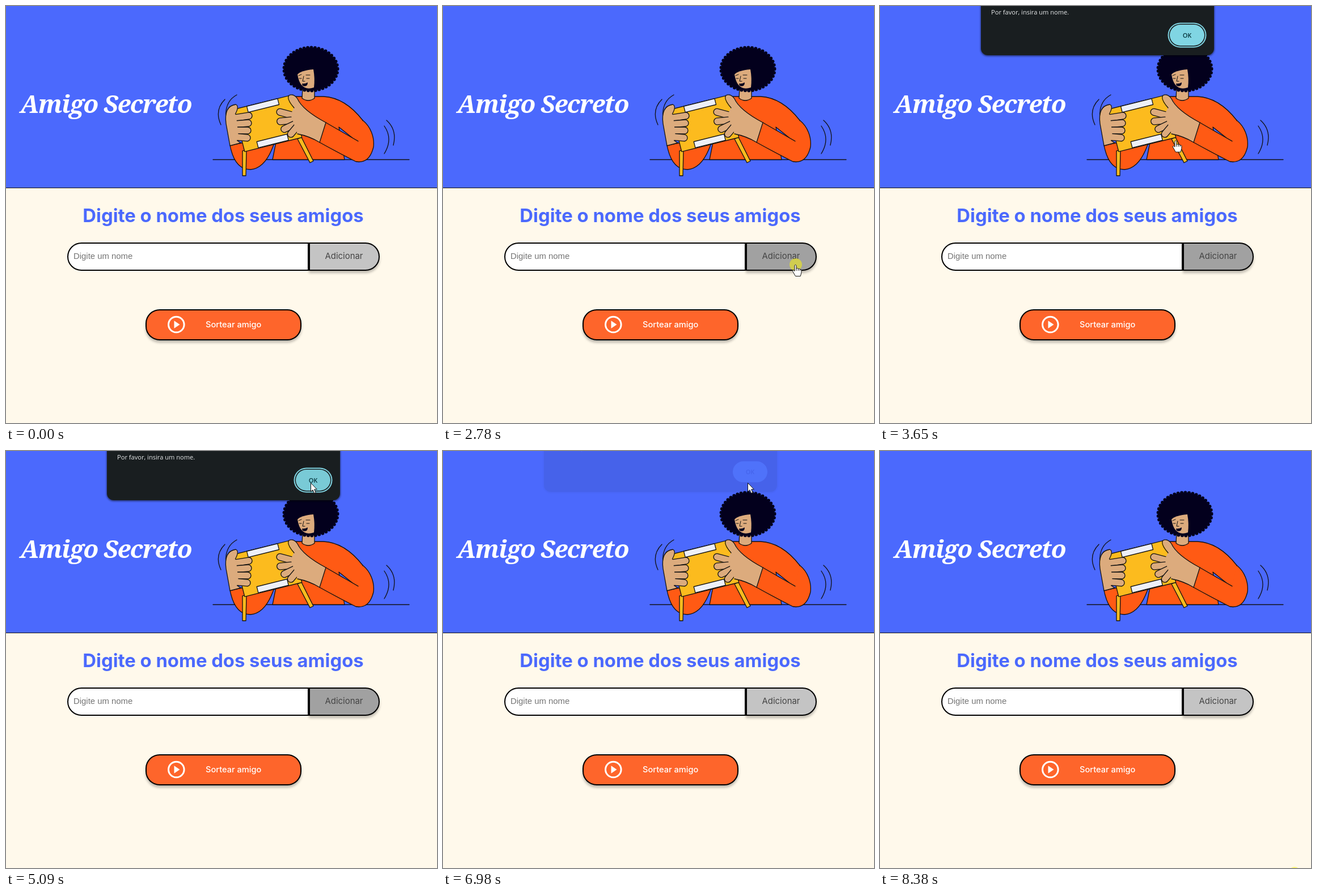
An HTML page that plays this animation: 760x737 px, repeating every 8.45 s.

```html
<!DOCTYPE html>
<html lang="pt-BR">
<head>
<meta charset="utf-8">
<title>Amigo Secreto</title>
<style>
* { box-sizing: border-box; }
html, body { margin: 0; width: 100%; height: 100%; overflow: hidden; background: #fff9eb; }
#stage { position: relative; width: 760px; height: 737px; overflow: hidden; background: #fff9eb; font: 14.9px/1 Inter, sans-serif; }
#stage > * { position: absolute; }
header { left: 0; top: 0; width: 760px; height: 322px; background: #4b69fd; border-bottom: 1px solid #111; }
h1, h2 { margin: 0; white-space: nowrap; }
h1 { left: 25px; top: 147px; color: #fff; font: italic 800 44px/50px "Noto Serif", serif; letter-spacing: -1.4px; }
h2 { left: 3px; top: 349px; width: 760px; text-align: center; color: #4b69fd; font: 700 32.8px/42px Inter, sans-serif; }
.pill { display: flex; align-items: center; justify-content: center; border: 2px solid #000; box-shadow: 0 4px 4px rgba(0,0,0,.25); }
#field { left: 108px; top: 418px; width: 426px; height: 49.5px; padding-left: 9px; background: #fff; border: 2px solid #000; border-radius: 25px 0 0 25px; color: #757575; font: 14.9px/44px "Liberation Sans", Arial, sans-serif; }
#field.focus { border-radius: 25px 4px 4px 25px; }
#caret { left: 119px; top: 435px; width: 1px; height: 16px; background: #000; }
#add { left: 533.5px; top: 418px; width: 125px; height: 49.5px; border-radius: 0 25px 25px 0; background: #c4c4c4; color: #444; }
#add.hover { background: #a1a1a1; }
#draw { left: 245.5px; top: 536px; width: 275.5px; height: 54.5px; border-radius: 25px; background: #fe652b; color: #fff; font-weight: 500; font-size: 14.6px; }
#draw.hover { background: #e55720; }
#draw span { position: absolute; left: 104.5px; }
svg { left: 0; top: 0; overflow: visible; }
#dialog { left: 177.5px; top: -40px; width: 411.5px; height: 127px; background: #191e20; border-radius: 12px; box-shadow: 0 1px 3px 1px rgba(0,0,0,.45); color: #e6e8e9; }
#dialog p { position: absolute; left: 18.5px; top: 43px; margin: 0; font: 11.1px/16px "Open Sans", sans-serif; white-space: nowrap; }
#ok { position: absolute; left: 333.5px; top: 73px; width: 61px; height: 37px; border-radius: 19px; background: #80d5e3; color: #07363e; font: 600 11px/37px "Open Sans", sans-serif; text-align: center; }
#ok.ring { box-shadow: 0 0 0 1.5px #191e20, 0 0 0 3.5px #80d5e3; }
#ok.hover { background: #79cad6; }
#halo { left: -11px; top: -11px; width: 22px; height: 22px; border-radius: 50%; background: rgba(255,250,0,.5); }
</style>
</head>
<body>
<div id="stage">
  <header></header>
  <h1>Amigo Secreto</h1>

  <svg id="art" width="760" height="330" fill="none" stroke="#111" stroke-width="1.3" stroke-linejoin="round" stroke-linecap="round">
    <path d="M365 271.5H711M386 165Q367 184 379 210M407 157Q385 169 388 199M671 202Q690 219 683 246M667 212Q683 235 667 261"/>
    <g fill="#ff5a14">
      <path d="M510 160H560Q598 162 629 202L640 250L612 234L587 214L597 271.5H470L477 236Z"/>
      <path d="M395 246Q403 289 431 289Q459 287 474 239L416 242Z"/>
    </g>
    <path d="M523 145L544 142V163Q533 171 522 163Z" fill="#dcab7d"/>
    <g stroke="none" fill="#03001d">
      <ellipse id="hair" cx="537.5" cy="111.5" rx="47" ry="38"/>
      <use href="#hair" fill="none" stroke="#03001d" stroke-width="6" stroke-dasharray="0 6.5"/>
      <path d="M514 121Q520 114 542 112Q545 128 543 144Q519 152 514 121Z" fill="#dcab7d"/>
      <path d="M522 137Q527 138 532 135Q532 144 523 141Z"/>
    </g>
    <path d="M516 123L521 121M529 122H536M517 128H521M530 128H535M525 124L523 133H527" stroke-width="1"/>
    <path d="M417 256L424 254L423 300H417ZM514 235L521 232L542 274L536 277Z" fill="#fcbb1e"/>
    <g transform="translate(462 207.5) rotate(-14)">
      <rect x="-52" y="-38.5" width="104" height="77" fill="#fcbb1e"/>
      <g fill="#eef0f8">
        <rect x="-29" y="-38.5" width="56" height="11"/>
        <rect x="-27" y="26.5" width="55" height="11"/>
      </g>
    </g>
    <path d="M395 247L388 208Q384 177 405 174Q413 177 402 195L408 238L414 242Z" fill="#dcab7d"/>
    <g id="leftFingers"></g>
    <path d="M399 196L403 232" stroke="#dcab7d" stroke-width="14"/>
    <g id="rightFingers"></g>
    <path d="M564 206Q530 190 514 164Q507 154 499 158Q497 165 508 179L502 192L514 226Q535 230 553 241Z" fill="#dcab7d" stroke="none"/>
    <path d="M508 180Q494 164 499 158Q507 154 514 164Q523 184 564 206M514 226Q535 230 553 241"/>
    <path d="M564 206L621 239L629 202C643 213 650 232 648 249Q641 279 617 275Q589 261 553 241Z" fill="#ff5a14" stroke="none"/>
    <path d="M621 239L564 206L553 241Q589 261 617 275Q641 279 648 249C650 232 643 213 629 202"/>
  </svg>

  <h2>Digite o nome dos seus amigos</h2>
  <div id="add" class="pill">Adicionar</div>
  <div id="field">Digite um nome</div>
  <div id="caret"></div>
  <div id="draw" class="pill">
    <svg style="position:absolute" width="100" height="50"><circle cx="52.3" cy="25" r="13.8" fill="none" stroke="#fff" stroke-width="3"/><path d="M48.5 18.2L58.5 25L48.5 31.8Z" fill="#fff"/></svg>
    <span>Sortear amigo</span>
  </div>

  <div id="dialog"><p>Por favor, insira um nome.</p><div id="ok">OK</div></div>
  <div id="halo"></div>

  <svg id="cursor" width="24" height="24" fill="#fff" stroke="#111" stroke-linejoin="round">
    <path id="arrow" d="M.5 .5V16L4 12.7L6.6 18.7L9.2 17.5L6.7 11.8H11.3Z"/>
    <g id="hand">
      <path d="M-2 1.5Q-.5-1 1 1.5V7Q4 5.5 4.3 7.5Q7 6.5 7.3 8.5Q10 8 10 10V14L8.3 20.5H-.5L-5.5 11.5Q-5.5 8-2 11.5Z"/>
      <path d="M1 7V11M4.3 7.5V11M7.3 8.5V11" fill="none"/>
    </g>
    <path id="beam" d="M-3-8Q0-8 0-6Q0-8 3-8M0-6V6M-3 8Q0 8 0 6Q0 8 3 8" fill="none"/>
  </svg>
</div>

<script>
const LOOP = 8450;
const HALO_TIME = 150;
const $ = id => document.getElementById(id);

// Four outlined round strokes make the fingers of a hand
function drawFingers(id, bone) {
  const layer = (d, color, width) => `<path d="${d}" stroke="${color}" stroke-width="${width}"/>`;
  for (let i = 0; i < 4; i++) {
    const d = bone(i);
    $(id).innerHTML += layer(d, '#111', 13.3) + layer(d, '#dcab7d', 10.7);
  }
}
drawFingers('leftFingers', i => `M403 ${198 + 11 * i}L${428 - i} ${194 + 13 * i}`);
drawFingers('rightFingers', i => {
  const angle = (199 - 25 * i) * Math.PI / 180, reach = 39 - 2.5 * i;
  return `M515 ${196 + 5 * i}L${520 + reach * Math.cos(angle)} ${200 + reach * Math.sin(angle)}`;
});

// Pointer legs: begin, end, x, y
const origin = [408, 675];
const legs = [
  [130, 700, 386, 443], [1010, 1290, 574, 466], [1290, 1830, 622, 457],
  [3440, 3850, 491, 170], [3850, 4270, 512, 126], [4480, 5090, 537, 56],
  [7030, 7610, 538, 520], [7640, 8110, 731, 746]
];
const clicks = [730, 2780, 6700, 8380];

const within = (v, a, b) => v >= a && v < b;
const ramp = (t, a, b) => Math.min(1, Math.max(0, (t - a) / (b - a)));
const easeOut = k => 1 - (1 - k) ** 2;
const show = (id, on) => $(id).style.display = on ? '' : 'none';
const move = (id, x, y) => $(id).style.transform = `translate(${x}px, ${y}px)`;

function pointer(t) {
  return legs.reduce(([x, y], [begin, end, toX, toY]) => {
    const k = easeOut(ramp(t, begin, end));
    return [x + (toX - x) * k, y + (toY - y) * k];
  }, origin);
}

function render(t) {
  const [x, y] = pointer(t);
  const visible = within(t, 130, 8110);
  const modal = within(t, 2780, 6860);
  const inRow = within(y, 418, 468);
  const overAdd = modal || inRow && within(x, 533, 658);
  const overDraw = !modal && visible && within(y, 536, 591) && within(x, 246, 521);
  const hand = modal ? t < 3720 : overAdd || overDraw;
  const beam = !modal && inRow && within(x, 108, 533);

  show('cursor', visible);
  move('cursor', x, y);
  show('hand', hand);
  show('beam', beam);
  show('arrow', !hand && !beam);

  $('add').classList.toggle('hover', overAdd);
  $('draw').classList.toggle('hover', overDraw);
  $('field').classList.toggle('focus', within(t, 780, 2780));
  show('caret', within(t, 780, 2780) && (t - 780) % 1050 < 525);

  const open = ramp(t, 2880, 3050) - ramp(t, 6770, 7000);
  $('dialog').style.opacity = open;
  move('dialog', 0, -16 * (1 - open));
  $('ok').classList.toggle('ring', within(t, 2980, 6840));
  $('ok').classList.toggle('hover', within(t, 4900, 6860));

  show('halo', clicks.some(c => within(t, c, c + HALO_TIME)));
  move('halo', x, y);
}

const start = performance.now();
function tick(now) {
  render(Math.max(0, now - start) % LOOP);
  requestAnimationFrame(tick);
}
render(0);
requestAnimationFrame(tick);
</script>
</body>
</html>
```
